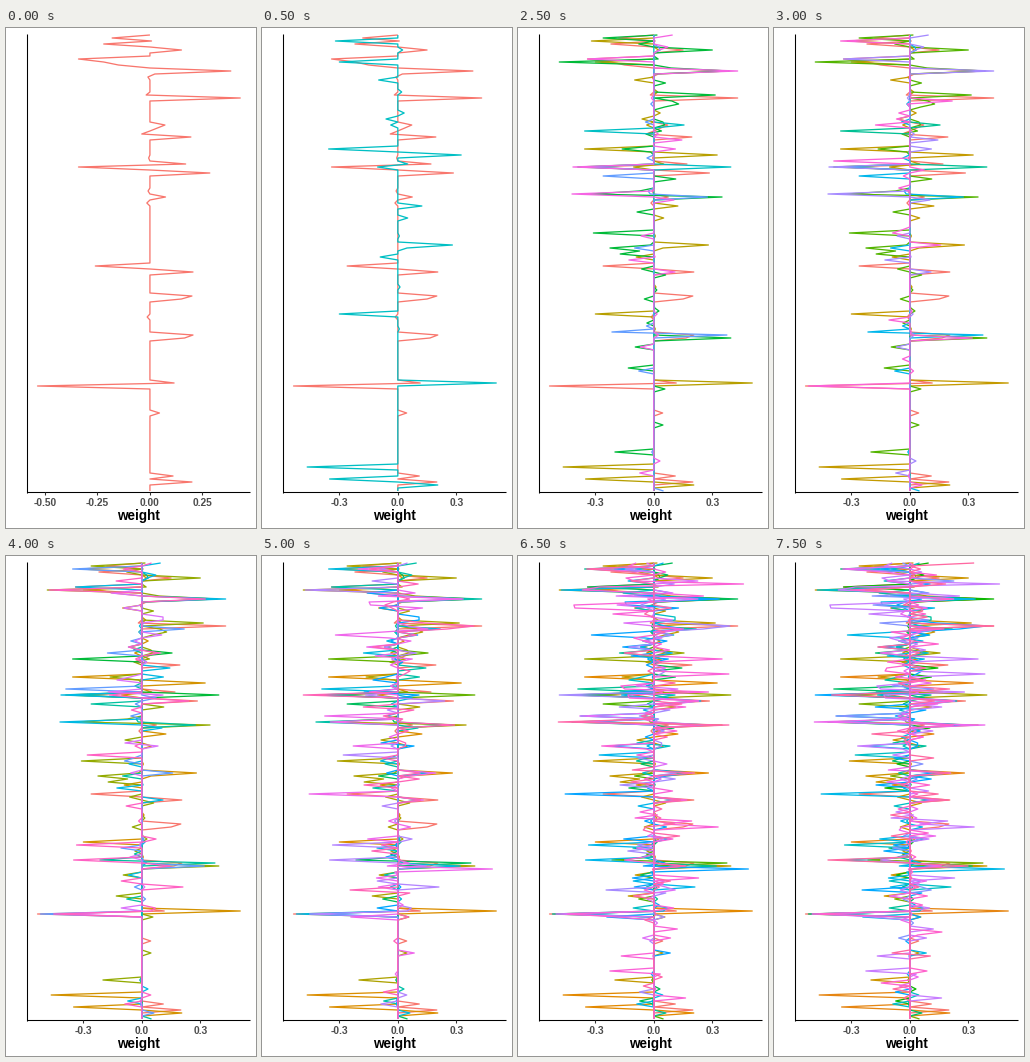
Recreate the animation shown at these times as a matplotlib script. Size 250x500 px, loop 8000 ms.

```python
import numpy as np
import matplotlib.pyplot as plt
from matplotlib.animation import FuncAnimation

W, H, DPI = 250, 500, 100
PT = 72 / DPI                      # points per pixel
LEFT, RIGHT, TOP, BASE = 21.4, 244.4, 6, 464
ROWS, ROW_TOP, ROW_STEP = 153, 7, 3
ROW = np.arange(ROWS)
plt.rcParams["font.family"] = "Liberation Sans"

# Rows where many lines peak together, with the largest weight there.
SHARED = {2: -0.35, 9: -0.47, 12: 0.43, 22: 0.3, 44: -0.42, 46: 0.28,
          53: -0.42, 54: 0.33, 70: 0.25, 79: 0.2, 101: 0.36, 117: -0.52}


def hcl(hue, chroma=100, lum=65):
    """Polar LUV colour to clipped sRGB."""
    u = chroma * np.cos(np.radians(hue)) / (13 * lum) + 0.19784
    v = chroma * np.sin(np.radians(hue)) / (13 * lum) + 0.46834
    y = ((lum + 16) / 116) ** 3
    x = y * 9 * u / (4 * v)
    z = y * (12 - 3 * u - 20 * v) / (4 * v)
    rgb = np.array([[3.2406, -1.5372, -0.4986],
                    [-0.9689, 1.8758, 0.0415],
                    [0.0557, -0.2040, 1.0570]]) @ [x, y, z]
    rgb = np.clip(rgb, 0, 1)
    return np.where(rgb <= 0.0031308, 12.92 * rgb,
                    1.055 * rgb ** (1 / 2.4) - 0.055)


def series(seed, small, spread, share, peaks):
    """Small random weights, some of the shared peaks, then key peaks."""
    rng = np.random.default_rng(seed)
    density = np.select([ROW < 62, (ROW > 63) & (ROW < 119)], [1.5, 0.9], 0.3)
    rows = rng.choice(ROWS, small, replace=False, p=density / density.sum())
    w = np.zeros(ROWS)
    w[rows] = np.clip(rng.normal(0, spread, small), -0.28, 0.28)
    for row, size in SHARED.items():
        if rng.random() < share:
            w[row] = size * rng.uniform(0.4, 1)
    for row, size in peaks.items():
        w[row] = size
    return w


LINES = [
    series(1, 18, 0.035, 0, {
        1: -0.18, 3: -0.22, 5: 0.15, 8: -0.34, 9: -0.22, 10: -0.15,
        12: 0.385, 21: 0.43, 34: 0.195, 43: 0.17, 44: -0.34, 46: 0.285,
        77: -0.26, 79: 0.205, 87: 0.2, 88: 0.15, 100: 0.205, 101: 0.165,
        116: 0.115, 117: -0.535, 147: 0.11, 149: 0.2}),
    series(2, 16, 0.06, 0, {
        2: -0.32, 9: -0.3, 38: -0.355, 40: 0.325, 70: 0.28, 93: -0.3,
        116: 0.505, 144: -0.465, 148: -0.35, 150: 0.205}),
    series(3, 34, 0.08, 0, {
        1: -0.26, 5: 0.3, 9: -0.485, 12: 0.385, 20: 0.315, 44: -0.39,
        53: -0.325, 54: 0.35, 66: -0.31, 71: -0.225, 101: 0.395}),
    series(4, 0, 0, 0, {30: 0.155, 32: -0.355, 44: 0.395}),
    series(5, 16, 0.06, 0.2, {47: -0.26, 54: 0.275, 99: -0.215, 100: 0.375}),
    series(6, 18, 0.08, 0.1, {8: -0.34, 12: 0.43, 44: -0.415, 53: -0.42}),
    series(7, 20, 0.07, 0.3, {2: -0.355, 42: -0.39, 117: -0.52}),
    series(8, 22, 0.07, 0.2, {}),
    series(9, 22, 0.09, 0.2, {9: -0.475, 64: -0.28, 94: -0.335, 99: -0.35}),
    series(10, 36, 0.11, 0.3, {24: -0.32, 51: -0.375, 77: -0.455, 102: 0.485}),
    series(11, 28, 0.1, 0.4, {21: 0.39, 44: -0.485, 109: -0.245}),
    series(12, 34, 0.1, 0.4, {51: -0.38}),
    series(13, 55, 0.14, 0.3, {
        7: 0.46, 14: -0.41, 15: -0.405, 32: 0.35, 37: 0.385, 88: 0.33}),
    series(14, 34, 0.1, 0.4, {53: -0.49, 54: 0.385}),
    series(15, 34, 0.09, 0.4, {}),
    series(16, 34, 0.09, 0.4, {0: 0.33, 21: 0.43, 99: -0.42}),
]

fig = plt.figure(figsize=(W / DPI, H / DPI), dpi=DPI, facecolor="white")
ax = fig.add_axes([0, 0, 1, 1])


def stroke(x, y, color, width=1.07):
    ax.plot(x, y, color=color, lw=width * PT, solid_capstyle="butt")


def label(x, y, text, size, color):
    ax.text(x, y, text, size=size * PT, color=color, weight="bold",
            ha="center", va="baseline")


def draw(i):
    ax.cla()
    ax.set(xlim=(0, W), ylim=(H, 0))
    ax.axis("off")

    shown = LINES[:i + 1]
    lo, hi = np.min(shown), np.max(shown)
    pad = 0.05 * (hi - lo)

    def px(w):
        return LEFT + (w - lo + pad) / (hi - lo + 2 * pad) * (RIGHT - LEFT)

    for k, w in enumerate(shown):
        stroke(px(w), ROW_TOP + ROW_STEP * ROW,
               hcl(15 + 360 * k / len(shown)), 1.3)

    stroke([LEFT, LEFT], [TOP, BASE + 0.5], "black")
    stroke([LEFT, RIGHT], [BASE, BASE], "black")
    step, digits = (0.25, 2) if i == 0 else (0.3, 1)
    for n in range(-2 if i == 0 else -1, 2):
        x = px(n * step)
        stroke([x, x], [BASE, BASE + 3], "#333333")
        label(x, 478, f"{n * step:.{digits}f}", 10.3, "#4d4d4d")
    label((LEFT + RIGHT) / 2, 492, "weight", 13.5, "black")
    return []


anim = FuncAnimation(fig, draw, frames=len(LINES), init_func=lambda: [],
                     interval=500, repeat=True, repeat_delay=0)
plt.show()
```
